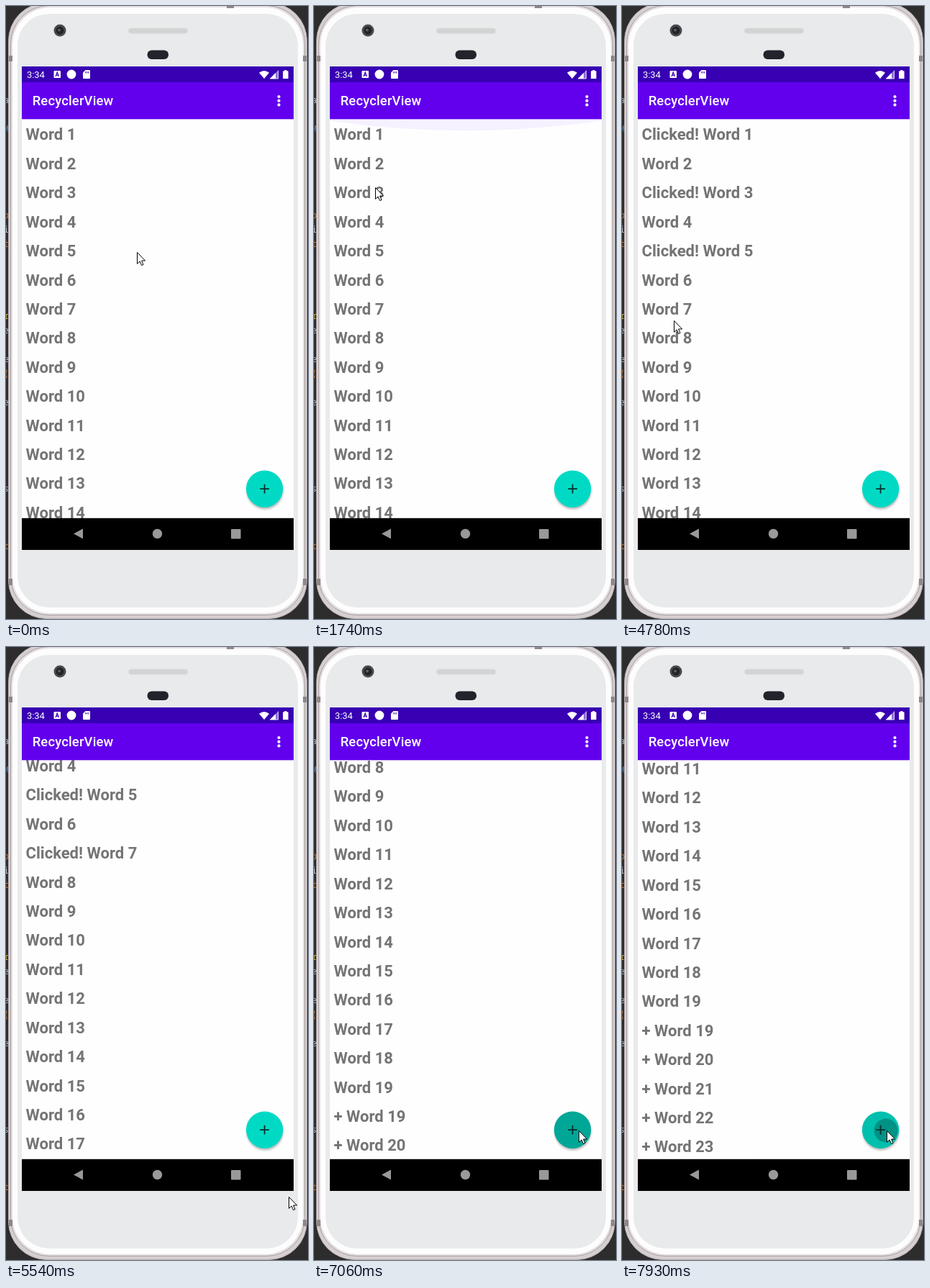
Write an HTML page that moves like this. It is 420 by 852 pixels and loops after 8 s.

```html
<!DOCTYPE html>
<html lang="en">
<head>
<meta charset="utf-8">
<title>RecyclerView</title>
<style>
html, body { margin: 0; width: 100%; height: 100%; overflow: hidden; background: #2d2d2e; }
svg { display: block; width: 420px; height: 852px; }
text { font-family: Roboto, "Open Sans", sans-serif; }
#rows text { font-size: 22.06px; font-weight: 700; fill: #747474; white-space: pre; }
#code text { font: 12px "Noto Sans Mono", monospace; text-anchor: end; }
</style>
</head>
<body>
<svg viewBox="0 0 420 852">
  <defs>
    <clipPath id="list"><rect x="22" y="157" width="378" height="555"/></clipPath>
    <clipPath id="fabClip"><circle cx="359.6" cy="671.2" r="25.7"/></clipPath>
    <filter id="soft" x="-30%" y="-30%" width="160%" height="160%"><feGaussianBlur stdDeviation="1.8"/></filter>
  </defs>

  <rect width="420" height="852" fill="#2d2d2e"/>
  <g id="code"></g>

  <!-- phone -->
  <rect x="3.5" y="-4.5" width="415" height="856" rx="53" fill="#d6cfd0" stroke="#b5acae"/>
  <rect x="6.5" y="-.5" width="409" height="847" rx="53" fill="#e3dedf" stroke="#a79fa1"/>
  <rect x="9" y="2" width="404" height="842" rx="52" fill="#fdfdfd"/>
  <rect x="16" y="11" width="390" height="825" rx="44" fill="#e8eaeb"/>
  <g fill="#8f8789">
    <rect x="4" y="69" width="5" height="8"/><rect x="413" y="69" width="5" height="8"/>
    <rect x="4" y="796" width="5" height="9"/><rect x="413" y="796" width="5" height="9"/>
    <rect x="307" y="0" width="10" height="3"/>
  </g>
  <circle cx="75" cy="34" r="8.5" fill="#4a4b4e"/>
  <circle cx="75" cy="34" r="5.5" fill="#232427"/>
  <circle cx="74" cy="33.5" r="2" fill="#55606a"/>
  <rect x="170.5" y="31" width="82" height="7" rx="3.5" fill="#d3d3d4" stroke="#d9d9da"/>
  <rect x="196.5" y="61.5" width="29.5" height="12.5" rx="6" fill="#22232b"/>

  <!-- screen -->
  <rect x="22" y="84" width="378" height="672" fill="#fefefe"/>
  <g clip-path="url(#list)">
    <g id="rows"></g>
    <path id="glow" fill="#6200ee"/>
  </g>
  <rect x="22" y="84" width="378" height="22" fill="#3700b3"/>
  <rect x="22" y="106" width="378" height="51.3" fill="#6200ee"/>
  <g fill="#fff">
    <text x="28.9" y="99.7" font-size="12.9">3:34</text>
    <text x="36.7" y="138.2" font-size="18.4" font-weight="500" letter-spacing=".17">RecyclerView</text>
    <rect x="66.5" y="90" width="9.5" height="10" rx="1"/>
    <circle cx="91" cy="95" r="6.4"/>
    <path d="M110.5 89H116q1 0 1 1V100q0 1-1 1H108q-1 0-1-1V92.5Z"/>
    <path d="M352 92.8Q359 87 366 92.8L359 101Z"/>
    <path d="M367 101L378.5 89.5V101Z" opacity=".45"/>
    <path d="M367 101L375 93V101Z"/>
    <path d="M378.5 89.5V101H367" fill="none" stroke="#fff" stroke-width=".8"/>
    <path d="M387.3 89h3v1.3H392q.6 0 .6.6V100.4q0 .6-.6.6H385.7q-.6 0-.6-.6V90.9q0-.6.6-.6h1.6Z"/>
    <circle cx="379.5" cy="126" r="2.1"/><circle cx="379.5" cy="131.7" r="2.1"/><circle cx="379.5" cy="137.4" r="2.1"/>
  </g>
  <path d="M69 98L71.2 92L73.5 98M69.8 96.2H72.7" fill="none" stroke="#3700b3" stroke-width="1.2"/>
  <path d="M110.6 91v2.5M112.6 91v2.5M114.6 91v2.5" stroke="#3700b3" stroke-width=".9"/>
  <rect x="22" y="711.8" width="378" height="44.2" fill="#000"/>
  <g fill="#999">
    <path d="M94 733.5L107 726.5V740.5Z"/>
    <circle cx="210.5" cy="733.5" r="6.7"/>
    <rect x="313" y="727" width="13.5" height="13.5" rx="1"/>
  </g>

  <!-- add button -->
  <circle cx="360" cy="674" r="25.4" opacity=".27" filter="url(#soft)"/>
  <circle cx="359.6" cy="671.2" r="25.7" fill="#00dac5"/>
  <g clip-path="url(#fabClip)">
    <circle id="shade" cx="359.6" cy="671.2" r="26"/>
    <circle id="ripple" cx="367" cy="672"/>
  </g>
  <path d="M353.2 671.2H366M359.6 664.8V677.6" stroke="#07302c" stroke-width="1.8"/>

  <path id="cursor" d="M.5.5V16.3L4.1 12.9L6.6 18.5L9 17.5L6.6 12H11.6Z" fill="#fff" stroke="#000"/>
</svg>
<script>
const NS = "http://www.w3.org/2000/svg";
const $ = id => document.getElementById(id);

// The screen refreshes once per beat; all times below are in beats.
const LOOP = 8000, BEAT = 132.3, LEAD = 28;
const PITCH = 40.42, FIRST = 186.4, VIEW = 554.5, WORDS = 19;

// pointer moves: start, end, x, y
const moves = [
  [0, 4, 182, 340], [8, 11, 184, 445], [11, 13, 85, 252], [13, 18, 73, 189],
  [23, 25, 82, 270], [27, 29, 128, 311], [29, 30, 112, 348], [31, 33, 74, 374],
  [33, 35, 66, 428], [35, 36, 72, 437], [37, 39, 95, 583], [39, 42, 393, 764],
  [42, 45, 374, 665], [48, 50, 368, 672]];

const wordTaps = [22, 27, 33, 37];                        // on words 1, 3, 5, 7
const addTaps = [47, ...[0, 1, 2, 3].map(i => 52.5 + 2.5 * i)];

const progress = (n, a, b) => Math.min(1, Math.max(0, (n - a) / (b - a)));
const easeOut = p => 1 - (1 - p) ** 2;

function set(id, attrs) {
  for (const k in attrs) $(id).setAttribute(k, attrs[k]);
}

function addText(parent, x, y, str) {
  const el = document.createElementNS(NS, "text");
  el.setAttribute("x", x);
  el.setAttribute("y", y);
  el.textContent = str;
  parent.append(el);
  return el;
}

const rows = Array.from({ length: WORDS + addTaps.length }, (_, i) =>
  addText($("rows"), 27.5, FIRST + i * PITCH, ""));

// line ends of the editor behind the phone
const tint = { M: "#4f83c4", o: "#cc7832", t: "#cc7832", "(": "#cc7832", r: "#d9c04a" };
[..."a M     oit    re e( e     s   t"].forEach((c, i) =>
  addText($("code"), 4, 135 + i * 20, c).setAttribute("fill", tint[c] || "#a9b7c6"));

function label(i, n) {
  if (i >= WORDS) return n >= addTaps[i - WORDS] ? "+ Word " + i : "";
  return (i % 2 === 0 && n >= wordTaps[i / 2] ? "Clicked! " : "") + "Word " + (i + 1);
}

function drawPointer(n) {
  let x = 182, y = 342;
  for (const [a, b, toX, toY] of moves) {
    const p = easeOut(progress(n, a, b));
    x += (toX - x) * p;
    y += (toY - y) * p;
  }
  set("cursor", { transform: `translate(${Math.round(x)} ${Math.round(y)})` });
}

function drawList(n, taps, age) {
  const end = (WORDS + taps) * PITCH - VIEW;
  const lag = 2 * Math.max(0, 1 - 2 * age);
  const scroll = (end - lag) * progress(n, 39, 43) ** 1.6;
  set("rows", { transform: `translate(0 ${-scroll})` });
  rows.forEach((row, i) => {
    const str = label(i, n);
    if (row.textContent !== str) row.textContent = str;
  });
}

function drawGlow(n) {
  const pull = Math.sin(Math.PI * progress(n, 8, 14));
  const edge = 157 + 5 * pull;
  set("glow", { d: `M22 157V${edge}Q211 ${157 + 60 * pull} 400 ${edge}V157Z`, opacity: .1 * pull });
}

function drawButton(age) {
  const on = age < 1;
  set("shade", { opacity: on ? .12 * Math.max(0, 1 - 2 * age) : 0 });
  set("ripple", { r: on ? 16.5 + 70 * age : 0, opacity: .24 });
}

const start = performance.now();

function draw() {
  const time = (performance.now() - start) % LOOP;
  const n = Math.floor((time + LEAD) / BEAT);
  const done = addTaps.filter(tap => tap <= n);
  const age = done.length ? n - done[done.length - 1] : Infinity;
  drawPointer(n);
  drawList(n, done.length, age);
  drawGlow(n);
  drawButton(age);
  requestAnimationFrame(draw);
}
draw();
</script>
</body>
</html>
```
